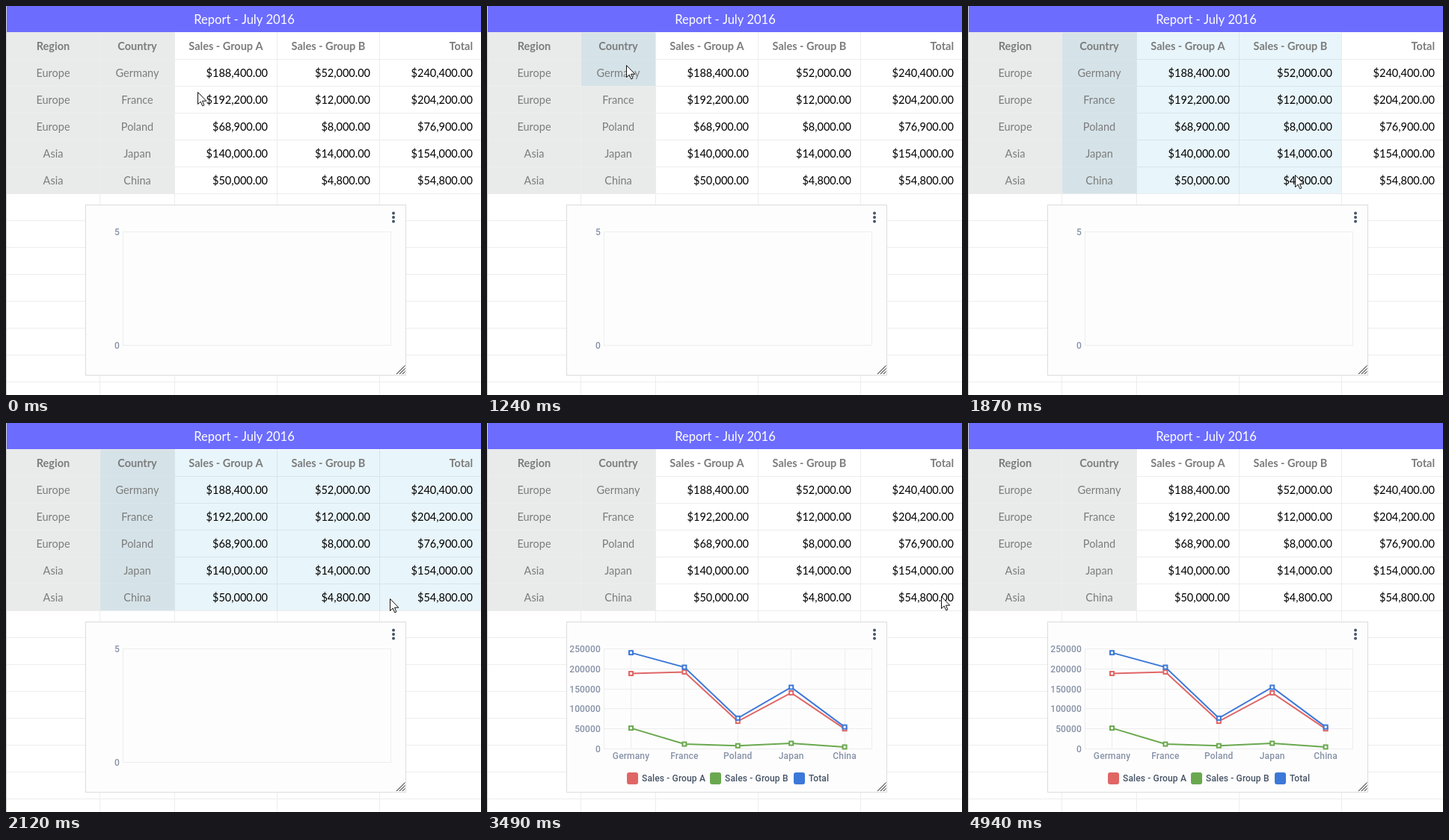
Write an HTML page with a canvas that moves like this. It is 635 px wide and 521 px high and loops after 5310 ms.

```html
<!DOCTYPE html>
<html lang="en">
<head>
<meta charset="utf-8">
<title>Report with range chart</title>
<style>
html, body { margin: 0; width: 100%; height: 100%; overflow: hidden; background: #fff }
canvas { display: block }
</style>
</head>
<body>
<canvas id="stage" width="635" height="521"></canvas>
<script>
const ctx = document.getElementById('stage').getContext('2d');
const LOOP = 5310, SELECT_AT = 1130, CHART_AT = 3490, GONE_AT = 4940;
const TOP = 35, ROW = 36;
const edges = [0, 125, 225, 362, 499, 635];
const rows = [
  ['Europe', 'Germany', 188400, 52000],
  ['Europe', 'France', 192200, 12000],
  ['Europe', 'Poland', 68900, 8000],
  ['Asia', 'Japan', 140000, 14000],
  ['Asia', 'China', 50000, 4800]
].map(r => [...r, r[2] + r[3]]);
const series = [
  { name: 'Sales - Group A', col: 2, color: '#e06666', x: 187 },
  { name: 'Sales - Group B', col: 3, color: '#6aa84f', x: 298 },
  { name: 'Total', col: 4, color: '#3c78d8', x: 410 }
];

// Pointer moves: first step, last step, number of steps, x, y, ease-out power
const moves = [
  [60, 550, 11, 153, 60, 1.4],
  [600, 880, 7, 138, 43, 1.4],
  [1130, 1240, 3, 186, 79, 1],
  [1290, 1650, 11, 366, 178, 1],
  [1700, 1870, 5, 437, 226, 1],
  [1900, 2048, 5, 500, 237, 1],
  [2085, 2230, 5, 567, 225, 1],
  [2280, 2530, 7, 607, 232, 1.6],
  [4020, 4220, 4, 607, 238, 1],
  [4470, 4680, 6, 589, 370, 1],
  [4720, 4940, 7, 628, 524, 1]
];
const arrow = new Path2D('M0 0V16L3.7 12.6 6.2 18.3 8.4 17.4 6 11.7H11.3Z');

const money = n => '$' + n.toLocaleString('en-US') + '.00';

function rect(x, y, w, h, color) {
  ctx.fillStyle = color;
  ctx.fillRect(x, y, w, h);
}

function text(s, x, y, font, color, align = 'center', spacing = 0) {
  ctx.font = font;
  ctx.fillStyle = color;
  ctx.textAlign = align;
  ctx.letterSpacing = spacing + 'px';
  ctx.fillText(s, x, y);
}

const cell = (s, x, y, color, align, weight = 400) =>
  text(s, x, y, weight + ' 14.5px Lato, "PT Sans", sans-serif', color, align);
const label = (s, x, y, align, color = '#8792a7') =>
  text(s, x, y, '500 12px Roboto, sans-serif', color, align, 0.15);

function line(points, color, width) {
  ctx.beginPath();
  points.forEach(p => ctx.lineTo(...p));
  ctx.strokeStyle = color;
  ctx.lineWidth = width;
  ctx.stroke();
}

function pointer(t) {
  let x = 256, y = 115;
  for (const [t0, t1, n, x1, y1, power] of moves) {
    if (t < t0) break;
    const step = Math.floor((t - t0) / (t1 - t0) * (n - 1) + 1e-6) + 1;
    const f = 1 - (1 - Math.min(step / n, 1)) ** power;
    x += (x1 - x) * f;
    y += (y1 - y) * f;
  }
  return [Math.round(x), Math.round(y)];
}

function drawTable() {
  rect(0, 0, 635, 521, '#fff');
  rect(0, TOP, 225, 216, '#e9eaea');
  for (let y = 71; y < 521; y += ROW) rect(0, y, 635, 1, '#ededed');
  for (const x of edges.slice(1, 5)) rect(x, TOP, 1, 486, '#ededed');
  rect(0, 0, 635, TOP, '#6c6cff');
  rect(0, 0, 1, 521, '#cecece');
}

function drawSelection(x, y) {
  // The range follows slightly behind the pointer tip
  const right = edges.find(e => e > x - 6 && e > 125);
  const count = Math.max(1, Math.ceil((y - 6 - TOP) / ROW));
  rect(126, 36, right - 126, count * ROW - 1, 'rgba(78,178,216,.13)');
}

function drawCells() {
  text('Report - July 2016', 318.5, 24, '16.5px Lato, "PT Sans", sans-serif', '#fff');
  const gray = '#7c7c7c';
  ['Region', 'Country', 'Sales - Group A', 'Sales - Group B'].forEach((s, i) =>
    cell(s, [63, 175.5, 294, 431][i], 59, gray, 'center', 700));
  cell('Total', 624, 59, gray, 'right', 700);
  rows.forEach((row, r) => row.forEach((v, c) => {
    const y = 95 + r * ROW;
    if (c < 2) cell(v, [63, 175.5][c], y, gray, 'center');
    else cell(money(v), [350, 487, 624][c - 2], y, '#000', 'right');
  }));
}

function drawPlot() {
  const px = i => 192.5 + 71.4 * i, py = v => 436 - v * 134 / 250000;
  for (let v = 0; v <= 250000; v += 50000) {
    rect(156, Math.round(py(v)), 359, 1, '#ededed');
    label(v, 152, Math.round(py(v)) + 5, 'right');
  }
  rows.forEach((row, i) => {
    rect(Math.floor(px(i)), 302, 1, 134, '#ededed');
    label(row[1], px(i), 450, 'center');
  });
  rect(156, 302, 1, 135, '#ededed');
  rect(514, 302, 1, 135, '#ededed');
  for (const { name, col, color, x } of series) {
    const points = rows.map((row, i) => [px(i), py(row[col]) + 0.5]);
    line(points, color, 2);
    for (const [a, b] of points) {
      rect(a - 3.5, b - 3.5, 7, 7, color);
      rect(a - 1.5, b - 1.5, 3, 3, '#fff');
    }
    ctx.fillStyle = color;
    ctx.beginPath();
    ctx.roundRect(x, 468, 15, 16, 3);
    ctx.fill();
    label(name, x + 20, 480, 'left', '#475466');
  }
}

function drawCard(filled) {
  rect(106, 266, 429, 229, '#dcdcdc');
  rect(107, 267, 427, 227, '#fdfdfd');
  for (const y of [277.5, 283, 288.5]) {
    ctx.fillStyle = '#475466';
    ctx.beginPath();
    ctx.arc(518, y, 2, 0, 7);
    ctx.fill();
  }
  for (const d of [11, 7, 3]) line([[533 - d, 493], [533.5, 492.5 - d]], '#222', 1);
  if (filled) return drawPlot();
  ctx.strokeStyle = '#ededed';
  ctx.lineWidth = 1;
  ctx.strokeRect(156.5, 302.5, 358, 152);
  label('5', 152, 307, 'right');
  label('0', 152, 459, 'right');
}

function drawPointer(x, y) {
  ctx.save();
  ctx.translate(x + 0.5, y + 0.5);
  ctx.fillStyle = '#fff';
  ctx.fill(arrow);
  ctx.strokeStyle = '#111';
  ctx.lineWidth = 1;
  ctx.stroke(arrow);
  ctx.restore();
}

const start = performance.now();
function frame() {
  const t = (performance.now() - start) % LOOP;
  const [x, y] = pointer(t);
  drawTable();
  if (t >= SELECT_AT && t < CHART_AT) drawSelection(x, y);
  drawCells();
  drawCard(t >= CHART_AT);
  if (t < GONE_AT) drawPointer(x, y);
  requestAnimationFrame(frame);
}
frame();
</script>
</body>
</html>
```
